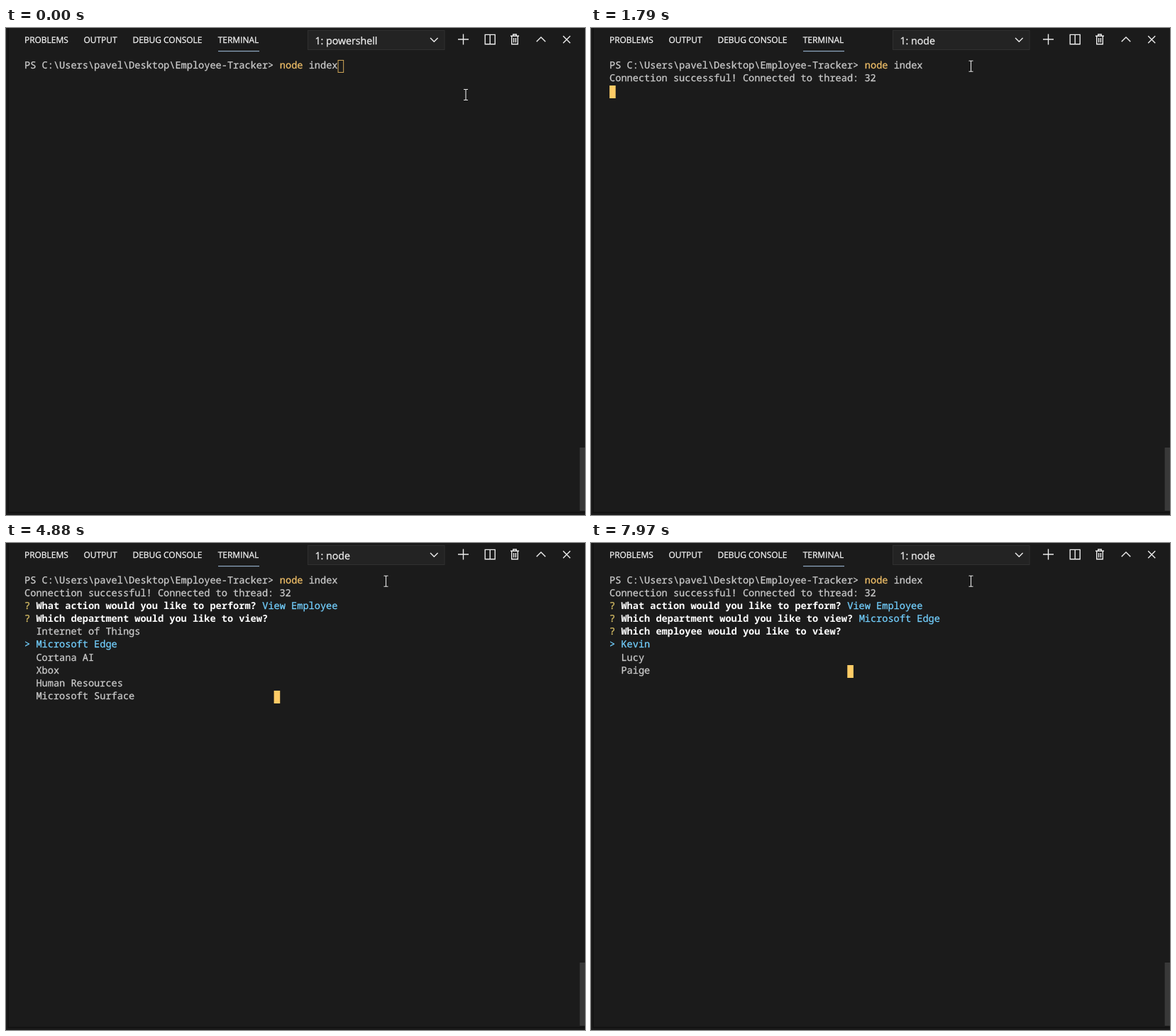
Animation of 816 by 686 pixels, one loop 8 s. Source, as an HTML page:

```html
<!DOCTYPE html>
<html lang="en">
<head>
<meta charset="utf-8">
<title>Terminal session</title>
<style>
  html, body { margin: 0; width: 100%; height: 100%; overflow: hidden; background: #1b1b1b; }
  svg { display: block; width: 816px; height: 686px; }
  text { text-rendering: geometricPrecision; stroke-width: .28; }
  .tabs { font: 11.95px "Open Sans", "Noto Sans", sans-serif; fill: #f4f4f4; stroke: #f4f4f4; }
  .pick { font: 14.2px "Open Sans", "Noto Sans", sans-serif; fill: #f0f0f0; stroke: #f0f0f0; }
  .icons { fill: none; stroke: #ececec; stroke-width: 1.4; }
  .term { font: 13.625px "Noto Sans Mono", "DejaVu Sans Mono", monospace; fill: #cccccc; stroke: #cccccc; }
  .cmd { fill: #f0bf68; stroke: #f0bf68; }
  .mark { fill: #d8bf66; stroke: #d8bf66; }
  .bold { fill: #ffffff; stroke: none; font-weight: 700; }
  .blue { fill: #73d0ff; stroke: #73d0ff; }
</style>
</head>
<body>
<svg viewBox="0 0 816 686">
  <rect width="816" height="686" fill="#1b1b1b"/>
  <path d="M3 0V682.5H816" fill="none" stroke="#101010" stroke-width="1.4"/>
  <rect x="808.6" y="591" width="7.4" height="89" fill="#393939"/>

  <g class="tabs">
    <text x="26" y="21">PROBLEMS</text>
    <text x="109.5" y="21">OUTPUT</text>
    <text x="178.5" y="21">DEBUG CONSOLE</text>
    <text x="298.7" y="21">TERMINAL</text>
  </g>
  <rect x="299" y="32" width="58" height="1.2" fill="#8fa9c4"/>

  <rect x="425.5" y="3.5" width="192.5" height="27" fill="#232323" stroke="#303030"/>
  <text class="pick" id="shell" x="435.5" y="23"></text>

  <g class="icons">
    <path d="M598 14l5.3 5.3 5.3-5.3"/>
    <path d="M637 16h15M644.5 8.5v15"/>
    <path d="M675.2 9.4h14v13.4h-14zM682.2 9.4v13.4"/>
    <path d="M711 11.3h12M714.8 11.3V9h4.4v2.3M712.7 11.3v11.5h8.6V11.3M715.6 14v6.5M718.4 14v6.5"/>
    <path d="M747.7 19.3l6.3-6.3 6.3 6.3"/>
    <path d="M785.2 11.3l10 10M795.2 11.3l-10 10"/>
  </g>

  <rect id="caret"/>
  <g class="term" id="term"></g>
  <path id="mouse" d="M-3-7.5h2.2q.8 0 .8.8V6.7q0 .8-.8.8H-3M3-7.5H.8q-.8 0-.8.8M0 6.7q0 .8.8.8H3"
    fill="none" stroke="#e6e6e6" stroke-width="1.1"/>
</svg>
<script>
const LOOP = 8000, LEFT = 26.1, COL = 8.175, LINE = 18.13;
const $ = id => document.getElementById(id);

// A row is a list of [column, class, text].
const prompt = [[0, "", String.raw`PS C:\Users\pavel\Desktop\Employee-Tracker>`], [44, "cmd", "node"], [49, "", "index"]];
const connected = [[0, "", "Connection successful! Connected to thread: 32"]];
const HINT = "(Use arrow keys)";

const ask = (question, tail, cls = "") =>
  [[0, "mark", "?"], [2, "bold", question], [question.length + 3, cls, tail]];
const menu = (items, chosen) => items.map((item, i) =>
  i === chosen ? [[0, "blue", ">"], [2, "blue", item]] : [[2, "", item]]);

const ACTION = "What action would you like to perform?";
const DEPARTMENT = "Which department would you like to view?";
const EMPLOYEE = "Which employee would you like to view?";
const actions = ["View Employee", "View Department", "View Role", "Add Employee",
  "Add Department", "Add Role", "Update Role"];
const departments = ["Internet of Things", "Microsoft Edge", "Cortana AI", "Xbox",
  "Human Resources", "Microsoft Surface"];
const employees = ["Kevin", "Lucy", "Paige"];

const start = [prompt, connected];
const acted = [...start, ask(ACTION, "View Employee", "blue")];
const placed = [...acted, ask(DEPARTMENT, "Microsoft Edge", "blue")];

const screens = [
  { at: 0, rows: [prompt], caret: [54, 0], hollow: true },
  { at: 490, rows: [prompt], caret: [54, 0] },
  { at: 1280, rows: [prompt], caret: [0, 1] },
  { at: 1790, rows: start, caret: [0, 2] },
  { at: 1830, caret: [57, 10],
    rows: [...start, ask(ACTION, HINT), ...menu(actions, 0), [[0, "", "(Move up and down to reveal more choices)"]]] },
  { at: 3240, rows: [...acted, ask(DEPARTMENT, HINT), ...menu(departments, 0)], caret: [59, 9] },
  { at: 4880, rows: [...acted, ask(DEPARTMENT, ""), ...menu(departments, 1)], caret: [43, 9] },
  { at: 5970, rows: [...placed, ask(EMPLOYEE, HINT), ...menu(employees, 0)], caret: [57, 7] },
  { at: 7510, rows: [...placed, ask(EMPLOYEE, ""), ...menu(employees, 1)], caret: [41, 7] },
  { at: 7970, rows: [...placed, ask(EMPLOYEE, ""), ...menu(employees, 0)], caret: [41, 7] }
];

// The pointer moves once every 70 ms.
const path = [[648, 94], [638, 74], [612, 38], [583, 17], [559, 25], [541, 45], [535.5, 53.8]];

function setAttrs(node, attrs) {
  for (const key in attrs) node.setAttribute(key, attrs[key]);
}

function drawScreen({ rows, caret: [col, row], hollow }) {
  $("term").replaceChildren(...rows.flatMap((segments, r) => segments.map(([c, cls, str]) => {
    const node = document.createElementNS("http://www.w3.org/2000/svg", "text");
    setAttrs(node, { x: LEFT + c * COL, y: 56.8 + r * LINE, class: cls });
    node.textContent = str;
    return node;
  })));
  const inset = hollow ? 0.5 : 0;
  setAttrs($("caret"), {
    x: LEFT + col * COL + inset, y: Math.round(44.8 + row * LINE) + inset,
    width: 8.6 - 2 * inset, height: 18 - 2 * inset,
    fill: hollow ? "none" : "#ffcc66", stroke: hollow ? "#d0a657" : "none"
  });
}

let shown = null;
function render(t) {
  const screen = screens.findLast(s => s.at <= t);
  if (screen !== shown) drawScreen(shown = screen);
  $("shell").textContent = t < 1350 ? "1: powershell" : "1: node";
  const [x, y] = path[Math.min(path.length - 1, Math.floor(t / 70))];
  $("mouse").setAttribute("transform", `translate(${x} ${y})`);
}

const begin = performance.now();
function tick() {
  render((performance.now() - begin) % LOOP);
  requestAnimationFrame(tick);
}
tick();
</script>
</body>
</html>
```
